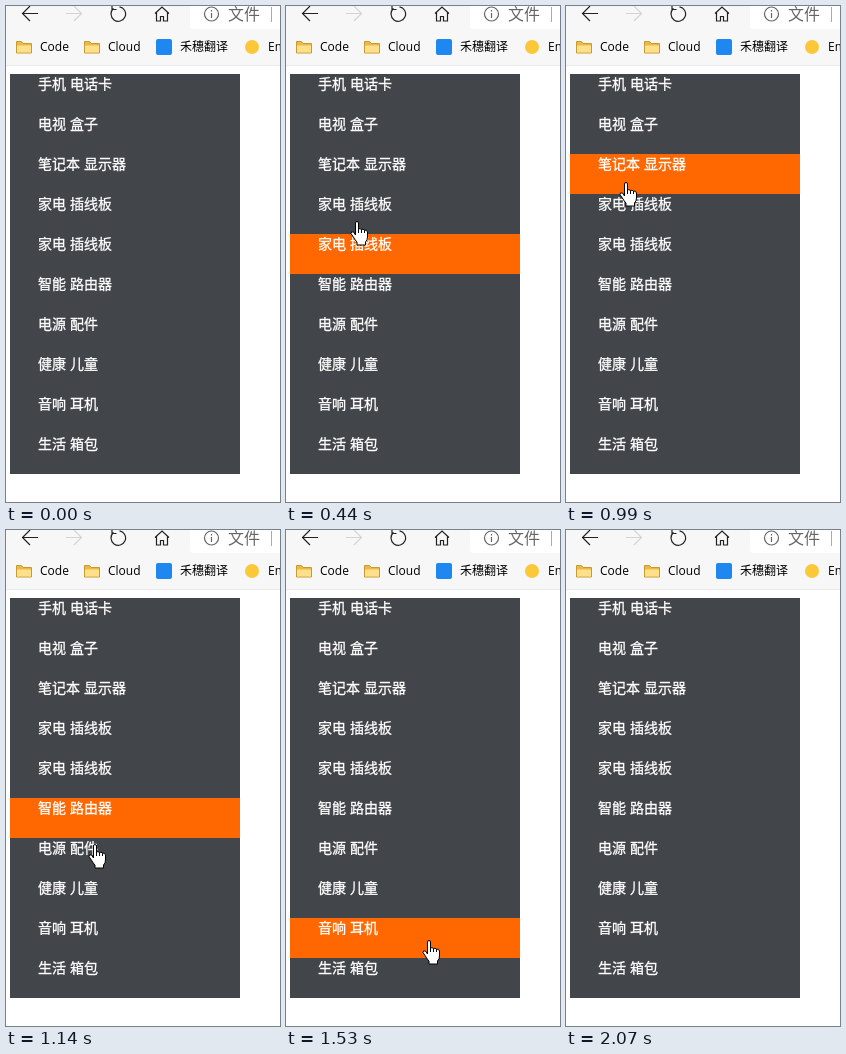
These frames come from a looping animation (274x496 px, 2370 ms). An HTML page:

```html
<!DOCTYPE html>
<html lang="zh-CN">
<head>
<meta charset="utf-8">
<title>菜单</title>
<style>
html, body { margin: 0; width: 100%; height: 100%; overflow: hidden; background: #fff; }
svg { display: block; }
text { font-family: "Liberation Sans", "Noto Sans CJK SC", "Noto Sans CJK", sans-serif; }
#menu text { font-size: 14px; fill: #fff; stroke: #fff; stroke-width: .3; }
.mark text { font: 12px "Open Sans", "Noto Sans CJK SC", "Noto Sans CJK", sans-serif; fill: #000; }
.icon { fill: none; stroke: #222; stroke-width: 1.2; }
</style>
</head>
<body>
<svg width="274" height="496" viewBox="0 0 274 496">
  <defs>
    <g id="folder">
      <path d="M.5 2.5h5l1.5 2h8.5v9.5H.5z" fill="#e9b949" stroke="#c99a2e"/>
      <path d="M1 6.5h14v7H1z" fill="#ffe08a"/>
    </g>
  </defs>

  <rect width="274" height="59" fill="#f7f7f7"/>
  <rect y="59" width="274" height="1" fill="#ebebeb"/>
  <path d="M274 23H187q-3 0-3-3V0h90z" fill="#fff"/>
  <g class="icon">
    <path d="M32 7.500H17M24 0l-7.500 7.500L24 15"/>
    <path d="M60 7.500h15M68 0l7.500 7.500L68 15" stroke="#d4d4d4"/>
    <path d="M107.500 2.500a7.300 7.300 0 1 0 6-1.700M106 -1v4.500h4.500"/>
    <path d="M149 7.500l7-6.500 7 6.500M150.500 6.500V15h4v-4.500h3V15h4V6.500"/>
    <circle cx="205.500" cy="8" r="7" stroke="#666"/>
    <path d="M205.500 7v5M205.500 4v1.500" stroke="#666"/>
    <path d="M265.500 1v15" stroke="#aaa" stroke-width="1"/>
  </g>
  <text x="222" y="14" font-size="16" fill="#666">文件</text>

  <g class="mark">
    <use href="#folder" x="10" y="33"/>
    <text x="34" y="45">Code</text>
    <use href="#folder" x="78" y="33"/>
    <text x="102" y="45">Cloud</text>
    <rect x="150" y="33" width="16" height="16" rx="2" fill="#1e88f0"/>
    <text x="174" y="45">禾穗翻译</text>
    <circle cx="246" cy="41" r="7" fill="#fbc83a"/>
    <text x="262" y="45">Em</text>
  </g>

  <rect x="4" y="68" width="230" height="400" fill="#424549"/>
  <rect id="hover" x="4" width="230" height="40" fill="#ff6700"/>
  <g id="menu"></g>

  <g id="cursor" fill="#fff" stroke="#000" stroke-linejoin="round">
    <path id="arrow" d="M.5 .5v16l3.7-3.5 2.5 5.5 2.3-1-2.5-5.5h5z"/>
    <g id="hand">
      <path d="M-1.5 14V2a1.500 1.500 0 0 1 3 0V8q1.500-1 3 .5q1.500-1 3 .7q2.500-.7 3 1.800v5q0 3-2 5v3H0v-3q-2-2-3-4l-3-4.500q0-2.500 2.500-1.500z"/>
      <path d="M1.500 8v4M4.500 8.500V12M7.500 9.200V12" fill="none"/>
    </g>
  </g>
</svg>
<script>
const $ = id => document.getElementById(id);
const LOOP = 2370, TICK = 76, TOP = 68, ROW = 40;
const LAG = 0.6; // the highlight trails the pointer by this many ticks
const items = ["手机 电话卡", "电视 盒子", "笔记本 显示器", "家电 插线板", "家电 插线板",
  "智能 路由器", "电源 配件", "健康 儿童", "音响 耳机", "生活 箱包"];
$("menu").innerHTML = items.map((s, i) => `<text x="32" y="${TOP + 15 + i * ROW}">${s}</text>`).join("");

// pointer path: tick, x, y
const path = [[1, 228, 486], [4, 89, 262], [9, 50, 97], [13, 60, 176],
  [15, 89, 314], [18, 123, 380], [23, 176, 448], [26, 237, 486]];
const first = path[0][0], last = path.at(-1)[0];

function slope(i, axis) {
  const a = path[Math.max(i - 1, 0)], b = path[Math.min(i + 1, path.length - 1)];
  return (b[axis] - a[axis]) / (b[0] - a[0]);
}

// smooth curve through the path points
function along(tick, axis) {
  const k = Math.min(Math.max(tick, first), last);
  const i = Math.max(path.findIndex(p => p[0] >= k), 1);
  const a = path[i - 1], b = path[i], span = b[0] - a[0];
  const u = (k - a[0]) / span, v = 1 - u;
  return a[axis] * v * v * (1 + 2 * u) + b[axis] * u * u * (1 + 2 * v)
    + span * u * v * (v * slope(i - 1, axis) - u * slope(i, axis));
}

const show = (id, on) => $(id).setAttribute("visibility", on ? "visible" : "hidden");

function draw(t) {
  const tick = Math.floor((t + 10) / TICK);
  const inside = tick >= first && tick <= last;
  const row = Math.floor((along(tick - LAG, 2) - TOP) / ROW);
  const over = inside && row < items.length;
  show("hover", over);
  show("hand", over);
  show("arrow", inside && !over);
  $("hover").setAttribute("y", TOP + row * ROW);
  $("cursor").setAttribute("transform",
    `translate(${Math.round(along(tick, 1))} ${Math.round(along(tick, 2))})`);
}

const start = performance.now();
function frame() {
  draw((performance.now() - start) % LOOP);
  requestAnimationFrame(frame);
}
frame();
</script>
</body>
</html>
```
